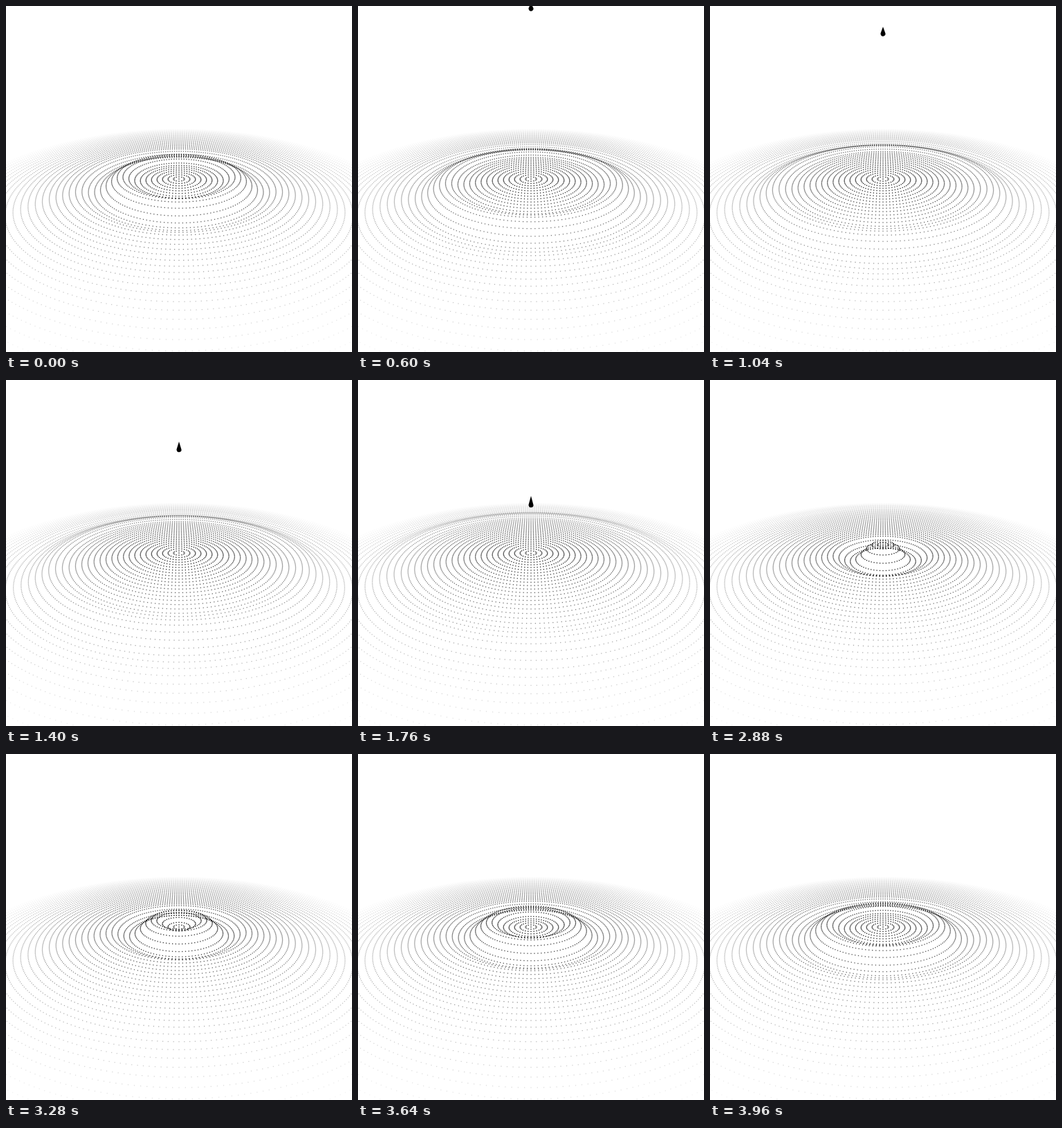
These frames come from a looping animation (500x500 px, 4000 ms). An HTML page with a canvas:

```html
<!DOCTYPE html>
<html lang="en">
<head>
<meta charset="utf-8">
<title>Drop and ripple</title>
<style>
  html, body { margin: 0; width: 100%; height: 100%; overflow: hidden; background: #fff; }
  canvas { display: block; width: 500px; height: 500px; }
</style>
</head>
<body>
<canvas id="stage" width="500" height="500"></canvas>
<script>
const ctx = document.getElementById('stage').getContext('2d');
const LOOP = 4, STEP = 0.04;
const CENTER = 250, CAMERA = 433;
const SIN = 0.396, COS = 0.918;      // camera elevation
const RINGS = 38, SPACING = 7.92, DOTS_PER_RING = 12, DOT = 1.3;
const WAVE = { start: 2.4, speed: 8, halfWidth: 5.5, height: 14.5 };
const DROP = { start: 0.49, top: 214, gravity: 182, radius: 3.5 };

// x to the right, z towards the viewer, h upwards
function project(x, z, h) {
  const scale = CAMERA / (CAMERA - z * COS - h * SIN);
  return [CENTER + x * scale, CENTER + (z * SIN - h * COS) * scale];
}

// A crest that follows a trough outwards, age in seconds, n in ring units
function pulse(n, age) {
  const x = (n - WAVE.speed * (age - WAVE.start)) / WAVE.halfWidth;
  return Math.abs(x) < 1 ? -1.25 * Math.sin(Math.PI * x) * (1 - x * x) : 0;
}

function drawRing(n, t) {
  const fade = 1 - n / RINGS;
  const h = WAVE.height * fade ** 1.5 * (pulse(n, t) + pulse(n, t + LOOP));
  const count = Math.max(1, n * DOTS_PER_RING);
  const r = n * SPACING;
  ctx.globalAlpha = fade;
  for (let i = 0; i < count; i++) {
    const angle = 2 * Math.PI * i / count;
    const [x, y] = project(r * Math.cos(angle), r * Math.sin(angle), h);
    ctx.fillRect(x - DOT / 2, y - DOT / 2, DOT, DOT);
  }
}

function drawDrop(t) {
  const fall = t - DROP.start;
  const h = DROP.top - DROP.gravity * fall * fall / 2;
  if (fall < 0 || h < -3) return;
  const [x, bottom] = project(0, 0, h);
  const { radius, gravity } = DROP;
  const cy = bottom - radius;
  const tip = bottom - 11 - 0.025 * gravity * fall;
  ctx.globalAlpha = 1;
  ctx.beginPath();
  ctx.moveTo(x, tip);
  ctx.lineTo(x + radius * 0.94, cy - radius * 0.3);
  ctx.arc(x, cy, radius, -0.3, Math.PI + 0.3);
  ctx.closePath();
  ctx.fill();
}

function draw(t) {
  ctx.globalAlpha = 1;
  ctx.fillStyle = '#fff';
  ctx.fillRect(0, 0, 500, 500);
  ctx.fillStyle = '#000';
  for (let n = 0; n < RINGS; n++) drawRing(n, t);
  drawDrop(t);
}

const begin = performance.now();
function tick() {
  const seconds = (performance.now() - begin) / 1000 % LOOP;
  draw(Math.floor(seconds / STEP + 1e-6) * STEP);
  requestAnimationFrame(tick);
}
tick();
</script>
</body>
</html>
```
